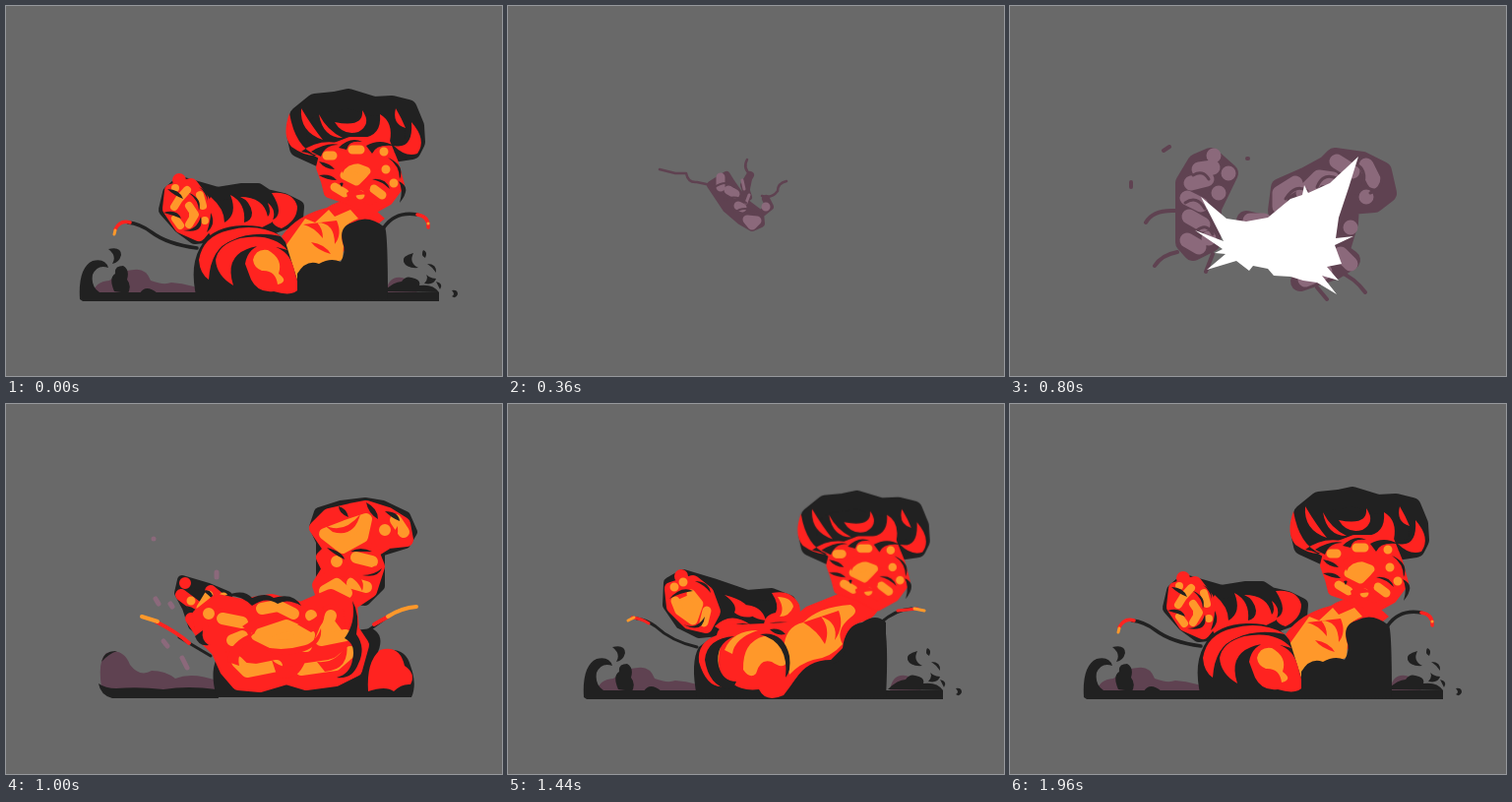
Recreate the animation shown at these times as an HTML page without scripts. Size 504 by 376 pixels, loop 2480 ms.

```html
<!DOCTYPE html>
<html lang="en">
<head>
<meta charset="utf-8">
<title>Explosion</title>
<style>
html,body{margin:0;height:100%;overflow:hidden;background:#696969}
svg{display:block;width:100vw;height:100vh;stroke-width:0;stroke-linecap:round;stroke-linejoin:round}
/* fill and stroke share a colour: a thick stroke turns points into puffs */
.k{fill:#212121;stroke:#212121}
.r{fill:#ff2320;stroke:#ff2320}
.o{fill:#ff982a;stroke:#ff982a}
.p{fill:#5f4251;stroke:#5f4251}
.l{fill:#8b697b;stroke:#8b697b}
.w{fill:#fff}
.s{fill:none}
.pose{opacity:0;animation:2480ms step-end infinite}
#trail{animation-name:trail;transform-origin:160px 165px}
#smoke{animation-name:smoke;transform-origin:245px 215px}
#flash{animation-name:flash;transform-origin:265px 240px}
#fire{animation-name:fire;transform-origin:275px 275px}
#swell{animation-name:swell}
#curl{animation-name:curl}
#roll{animation-name:roll}
#dome{animation-name:dome}
#rest{animation-name:rest}
@keyframes trail{
 4.83%{opacity:1;transform:scale(.15);animation-timing-function:steps(6)}
 14.51%{opacity:1;transform:scale(1)}
 20.96%{opacity:0}}
@keyframes smoke{
 20.96%{opacity:1;transform:scale(.4);animation-timing-function:steps(7)}
 32.25%{opacity:1;transform:scale(1)}
 33.86%{opacity:0}}
@keyframes flash{
 30.64%{opacity:1;transform:scale(.6)}
 32.25%{opacity:1;transform:scale(1)}
 33.86%{opacity:0}}
@keyframes fire{
 33.86%{opacity:1;transform:scale(.7);animation-timing-function:steps(4)}
 40.32%{opacity:1;transform:scale(1)}
 41.93%{opacity:0}}
@keyframes swell{41.93%{opacity:1}49.99%{opacity:0}}
@keyframes curl{49.99%{opacity:1}58.06%{opacity:0}}
@keyframes roll{58.06%{opacity:1}67.74%{opacity:0}}
@keyframes dome{67.74%{opacity:1}79.03%{opacity:0}}
@keyframes rest{0%{opacity:1}4.83%{opacity:0}79.03%{opacity:1}}
</style>
</head>
<body>
<svg viewBox="0 0 504 376">
<defs>
 <!-- young fire -->
 <g id="dirtA">
  <path class="p" d="M97 288Q93 260 102 253Q119 247 126 265Q136 278 148 271Q162 271 172 279Q190 272 216 282V294H100z"/>
  <path class="k" d="M94 284Q101 289 112 289Q135 287 160 290Q185 286 214 290L216 299H108Q96 296 94 284zM97 262Q100 250 113 251Q104 254 97 262z"/>
 </g>
 <g id="bodyA">
  <path class="k" d="M214 298Q206 270 216 255Q245 235 300 236L372 228Q385 235 378 252Q405 244 411 266Q418 285 412 298z"/>
  <path class="r" d="M368 292Q366 262 380 250Q400 244 405 266Q417 274 411 285Q402 284 394 292Q386 286 368 292z"/>
  <path class="r" stroke-width="14" d="M224 270L215 250 200 235 196 215 215 200 240 205 270 200 300 208 330 195 350 205 352 230 362 245 355 270 335 280 305 284 285 278 258 286 236 284z"/>
  <path class="o" stroke-width="12" d="M255 235L285 225 308 235 305 246 275 245zM230 240L240 236M330 215L320 240 345 235M235 262L245 272 275 266M300 270L335 265 350 252M260 208L276 205 292 213M220 218L240 222M206 213h0M310 215h0"/>
  <path class="r" d="M225 262q2-22 28-30q-20 20-16 34zM258 246q20 16 48 4q16-8 14-22q-6 16-20 18q-20 6-42 0zM270 260q18 16 36-4q-8 28-30 22zM316 262q22 2 30-20q4 28-22 30zM240 226q18-14 40-10q-22 4-28 18zM296 224q22-4 26-18q6 18-12 26z"/>
  <path class="k" d="M222 195q20-8 28 2q14-6 22 0q20-6 28 8q-14-8-24-2q-12-8-26 2q-12-12-28-10zM352 200q8 14 4 34q10 14 2 30q-6 16-22 14q14-4 16-18q4-16-8-22q12-16 8-38zM200 230q-2 10 6 15q-10 2-14-9z"/>
 </g>
 <g id="armA">
  <path class="k" stroke-width="10" d="M179 179L176 192 184 207 190 225 208 240 230 230 225 195 206 187z"/>
  <path class="r" stroke-width="12" d="M182 182h0M178 194L194 206M188 218L200 236M208 190L220 200M200 210h10"/>
  <path class="o" stroke-width="9" d="M206 194L198 207M196 220L206 229M218 206h0M188 200h0M221 196h0"/>
  <path class="k" d="M183 205q12 2 15 12q-10-6-15-12zM200 190q10-4 12 12q-5-8-12-12zM191 226q12-4 18 4q-10 0-18-4z"/>
 </g>
 <g id="capA">
  <path class="k" stroke-width="10" d="M313 125L318 110 340 103 365 100 383 103 406 114 413 130 406 142 380 150 380 185 365 200 320 196 320 140z"/>
  <path class="r" stroke-width="14" d="M315 126L328 113 350 108 366 105 388 112 404 122 407 138 388 140 372 150 378 165 370 190 352 202 340 200 322 196 318 184 328 168 322 156 330 148z"/>
  <path class="o" stroke-width="12" d="M324 132L345 124 366 117 362 135 342 146zM396 118L404 130M324 190L336 183 346 192M356 156L372 160M352 182L366 186M336 160h0M385 128h0"/>
  <path class="r" d="M322 122q20 12 38-10q-6 24-28 18zM374 138q16 0 24-14q2 24-20 24zM318 176q16-14 34-6q14 8 10 20q-8-18-22-14zM346 160q12 14 30 4q-10 18-26 8z"/>
  <path class="k" d="M338 104q8 2 10 11q-10-4-10-11zM366 100q12 6 12 17q-10-6-12-17zM385 109q14 0 15 10q-8-3-15-10zM326 146q16 4 18 12q-12-6-18-12zM350 150q10-6 22 0q-12 0-22 0zM362 174q12 0 20-7q-4 10-20 7z"/>
 </g>
 <g id="jetsA" class="s">
  <path class="k s" stroke-width="3" d="M176 237L208 256M385 218L364 233"/>
  <path class="r s" stroke-width="4" d="M152 221Q174 232 186 243M390 215L374 224"/>
  <path class="o s" stroke-width="4" d="M138 216L154 221M417 206Q402 207 388 216"/>
 </g>

 <!-- curling fire -->
 <g id="dirtB">
  <path class="p" d="M78 284Q76 270 90 264Q98 250 112 248Q122 254 113 260Q96 266 100 286Q120 282 130 273Q148 268 152 279Q164 284 170 279Q184 276 196 290zM384 294Q380 276 394 274Q410 286 430 284L442 292z"/>
  <path class="k" d="M84 298Q85 284 91 272Q94 264 104 262Q94 270 97 282Q108 286 116 288Q128 278 136 284Q144 274 150 288Q170 284 196 289H386Q410 284 424 291Q438 286 440 292Q453 286 453 297Q446 294 442 299zM97 253q10-9 20 0q-10 2-20 0zM403 254q12-11 25-1q10 2 8 14q-6-12-14-10q-10-5-19-3zM428 276q8-4 11 5z"/>
  <path class="r" d="M412 253q8-4 14 2zM432 262q5 3 3 5z"/>
 </g>
 <g id="bodyB">
  <path class="k" d="M194 298Q187 262 196 247L225 225 345 225 384 222Q389 240 386 298L290 300z"/>
  <path class="r" d="M196 262Q194 242 214 235Q216 222 240 224L285 222 305 206 350 188 380 202Q378 218 360 222Q344 228 342 248L330 260Q306 260 294 280L282 296Q264 304 257 290Q240 292 230 284Q206 296 196 262z"/>
  <path class="o" d="M282 250Q283 226 302 222Q318 206 350 204Q360 210 350 217Q334 230 342 244Q330 258 312 260Q298 264 288 275zM241 270Q240 242 262 236Q284 236 287 258Q284 272 270 262Q258 258 254 274Q248 280 241 270zM222 250q8-20 34-20q-24 8-26 24zM208 270q-2-16 10-24q-4 16 0 30z"/>
  <path class="r" d="M302 222q14 8 22 22q6-16-4-28q18 6 14 24q10-14 4-30z"/>
  <path class="k" d="M202 260q2-22 30-24q-20 8-16 30q4 16 18 16q-2 6-8 8q-20-4-24-30zM258 234q24-4 30 22q2 16-4 22q4-36-26-44zM268 229q10-2 16 5q-10 2-16-5z"/>
  <path class="k" d="M284 298Q294 274 308 268Q320 258 332 264Q346 258 344 244Q346 224 362 222Q376 212 386 222V298z"/>
 </g>
 <g id="armB">
  <path class="k" stroke-width="12" d="M180 176L166 184 165 206 178 225 196 234 235 230 260 224 292 216 288 202 270 195 245 197 210 185z"/>
  <path class="r" stroke-width="14" d="M178 177h0M190 183L168 190 170 208 186 224 203 228 211 213 204 194z"/>
  <path class="r" d="M222 196q26 6 28 22q-10 2-18-4q4-8-10-18zM240 206q20 0 24 16q-18-2-24-16zM270 194q20-4 28 12q4 16-10 18q-20-2-26 4q0-12 12-14q4-8-4-20zM212 228q16-16 36-2q-16-4-26 8z"/>
  <path class="o" stroke-width="9" d="M180 183h0M188 195L196 205 190 222 176 212 172 202M204 212L201 224M171 188h0"/>
  <path class="o" d="M276 198q14 0 16 10q-4 10-14 10q6-8-2-20z"/>
  <path class="k" d="M166 200q12-14 24-8q-14 2-24 8zM180 226q14 6 22-8q-2 18-22 8zM192 182q14 0 16 12q-6-8-16-12z"/>
 </g>
 <g id="capB">
  <path class="k" stroke-width="16" d="M312 115L325 104 345 99 366 102 390 102 403 114 407 126 421 128 416 144 394 142 366 146 316 148 311 146 317 135z"/>
  <path class="r" stroke-width="12" d="M328 155L335 146 365 142 390 146 394 165 393 182 375 194 350 196 331 186z"/>
  <path class="r" d="M308 132Q312 108 328 112Q342 100 358 110Q370 122 352 140Q338 152 320 148Q304 146 308 132zM366 106Q376 98 394 104Q410 112 416 124Q404 122 405 138Q392 146 382 134Q366 136 366 106z"/>
  <path class="o" stroke-width="10" d="M322 132L340 135 354 128M380 112L394 118M386 130h0M335 160L345 178 360 186M350 162L368 160M376 178L386 184M388 160h0M330 174h0M360 176h0"/>
  <path class="k" d="M334 100q4 14 20 18q-14 4-20-18zM356 104q16 6 16 28q-8-14-16-28zM376 110q12-2 18 14q-10-8-18-14zM324 152q16-6 28-4q14-12 22-8q16 0 24 6q-20-4-26 2q-20 0-24 8q-12-6-24-4zM392 164q8 6 4 22q-2-12-4-22z"/>
  <path class="r" d="M340 172q16-8 26 4q-12-2-18 10zM366 182q8-16 24-14q-14 6-18 22zM348 150q12 8 26 4q-12 14-26-4z"/>
 </g>
 <g id="jetsB">
  <path class="k s" stroke-width="3" d="M196 246Q170 240 154 225Q144 218 135 217M383 221Q398 208 414 207"/>
  <path class="r s" stroke-width="3" d="M147 222Q140 217 130 216M400 209L420 207"/>
  <path class="o s" stroke-width="3" d="M126 219L132 216M417 207L427 209"/>
 </g>

 <!-- cooling dome -->
 <g id="dirtC">
  <path class="p" d="M88 293Q90 280 105 279Q118 268 130 268Q142 266 147 279Q160 284 168 281Q190 282 206 293zM386 292Q388 274 402 276Q414 278 418 292z"/>
  <path class="k" d="M75 298Q73 266 88 259Q101 256 104 266Q93 262 88 273Q86 285 95 291H440V300H78zM104 247q13-3 13 6q-2 8-9 9q5-8-4-15zM110 290Q104 276 111 272Q110 264 119 264Q126 268 123 278Q128 284 124 292zM136 292q6-10 18 0zM384 290q10-10 18-10q4-6 10-4q10 2 8 8q14-2 20 7z"/>
  <path class="k" d="M414 251q-12 3-10 9q3 7 15 6q-10-5-5-15zM424 248q5 2 2 8q-5-3-2-8zM428 262q10 0 9 9q-4-6-9-9zM425 270q6 6 0 12q10 2 12-5q-8 0-12-7zM437 280q8 2 4 8zM453 289q6-1 6 4q-2 5-6 2q4-2 0-6z"/>
 </g>
 <g id="bodyC">
  <path class="r" d="M280 234Q296 212 326 205Q348 190 374 206L385 216 342 250 300 276z"/>
  <path class="o" d="M284 244L304 216 314 220 328 207 334 214 350 207 358 216Q336 224 343 244L342 258 318 264 296 282z"/>
  <path class="r" d="M302 222q10 2 20 14q0-10-6-16q18 0 18 22q8-10 2-24zM310 240q14 2 20 12q-14-4-20-12z"/>
  <path class="k" d="M194 298Q185 262 200 241Q212 224 240 223Q272 222 284 240L298 285 300 300z"/>
  <path class="r" d="M196 258Q200 234 226 228Q255 220 280 234Q250 228 230 238Q208 246 206 278Q197 272 196 258zM213 258Q216 242 238 236Q270 230 286 248Q262 240 245 247Q222 256 231 284Q214 274 213 258zM243 262Q246 244 264 242Q287 246 292 265L298 287Q292 296 272 290Q256 292 249 278z"/>
  <path class="o" d="M251 258Q254 246 266 248Q282 257 277 272Q288 280 276 283Q274 268 260 269Q252 266 251 258z"/>
  <path class="k" d="M296 300V272Q305 257 318 262Q330 255 340 260Q346 250 342 240Q338 224 352 220Q368 211 385 225Q388 230 388 298z"/>
 </g>
 <g id="armC">
  <path class="k" stroke-width="14" d="M177 180L166 190 162 207 177 224 192 235 240 230 270 225 295 216 296 204 282 197 265 193 256 187 240 187 215 191z"/>
  <path class="r" d="M208 194q14 12 14 26q14-8 6-28q16 8 14 28q8-2 8-10q-2-12-12-16q24 0 28 20q4-4 0-14q10 8 4 20q-24 14-58 18q-20-20-4-44zM270 190q22-2 26 14q0 14-16 22q-8-2-10-8q14-6 0-28z"/>
  <path class="r" stroke-width="14" d="M176 177h0M188 182L168 188 166 206 178 224 196 232 206 220 200 198z"/>
  <path class="o" stroke-width="8" d="M184 187L176 196 171 204M186 203L192 212 186 222M172 216L177 223M197 192L200 203M172 185h0M202 218h0"/>
  <path class="k" d="M164 186q12 0 16 10q-10-4-16-10zM160 210q14-4 18 6q-10-4-18-6zM186 190q14 6 10 18q0-10-10-18zM180 228q14 0 18-14q4 18-18 14zM196 184q10 4 9 14q-2-9-9-14zM208 210q6 12-4 20q4-12 4-20z"/>
 </g>
 <g id="capC">
  <path class="k" stroke-width="20" d="M295 130L298 112 314 99 334 97 348 94 374 102 392 101 408 105 415 122 416 138 412 146 385 150 320 154 298 144z"/>
  <path class="r" stroke-width="10" d="M324 148L350 138 385 138 394 160 400 182 388 198 370 208 352 198 328 190 325 178 320 164z"/>
  <path class="r" d="M288 109q-8 22 2 34q14 10 26 9q-22-8-28-43zM300 104q-2 24 22 32q-10-12-22-32zM318 110q4 24 24 24q-16-8-24-24zM334 118q8 14 24 10q14-8 4-22q2 18-28 12zM380 110q14 8 10 28q-14 2-28-4q20-2 18-24zM396 104q-4 16 10 20q-4-10-10-20zM412 118q16 18 6 32q-12 4-24-8q20 4 18-24zM300 148q18-14 42-8l-18 20q-10-10-24-12z"/>
  <path class="o" stroke-width="9" d="M350 162L366 168 356 178 344 172zM326 152h6M374 186L382 192M334 184L344 190M386 166h0M360 192h0M394 180h0M352 146h8M384 148h0"/>
  <path class="k" d="M310 148q16-10 28-7q-14 0-18 12zM338 144q12-12 24-6q-14-2-16 8zM366 142q14-8 28 0q-18-2-22 8zM394 148q12 0 14 8q-8-5-14-8zM388 154q18 8 12 22q0-14-12-22zM318 172q12-2 18 5q-10 0-18-5zM339 180q6-2 2 4zM372 176q14-2 18 10q-8-8-18-10zM399 178q14 6 1 22q4-14-1-22zM318 158q12 2 16 8q-10 0-16-8z"/>
  <path class="r" d="M338 158q14-6 22 2q-14 0-18 10zM364 182q2-14 16-16q-10 6-10 20zM346 190q10-8 22 2q-14-2-20 6z"/>
 </g>
 <g id="jetsC">
  <path class="k s" stroke-width="3.5" d="M194 246Q164 242 148 230Q136 221 124 220M384 225Q396 208 418 212"/>
  <path class="r s" stroke-width="3.5" d="M126 220Q116 217 111 227M418 212Q430 214 429 225"/>
  <path class="o s" stroke-width="3" d="M111 228L110 232M429 221h0"/>
 </g>
</defs>

<g id="trail" class="pose">
 <path class="p s" stroke-width="2.5" d="M154 166L170 170 181 170Q183 180 192 179L206 182M243 156Q238 165 247 172Q246 186 240 200M283 178Q274 180 274 188Q268 196 258 193"/>
 <path class="p" stroke-width="8" d="M206 182L222 172 227 180 234 190 244 202 256 211 257 221 248 225 236 218 222 206zM246 172L240 182 244 194M262 196L266 204 256 212"/>
 <path class="l" stroke-width="9" d="M216 174L216 184M224 187L231 191M234 203L238 205M243 217L253 218 248 223zM262 204h0"/>
 <path class="l s" stroke-width="3" d="M238 177L240 186M245 192L242 200"/>
 <path class="p s" stroke-width="2" d="M210 184Q222 176 230 184M220 198Q230 190 242 200M230 210Q240 202 254 210"/>
</g>

<g id="smoke" class="pose">
 <path class="p s" stroke-width="4" d="M138 220Q145 207 168 208M147 264Q154 253 170 250M199 270L206 252M156 147l6-4M123 179v5M241 155h1M334 270Q350 276 361 291M312 286L322 298"/>
 <path class="p" stroke-width="20" d="M204 154L190 160 178 180 178 212 178 240 186 249 204 240 205 205 222 170zM272 208L275 185 300 174 322 162 330 154 358 158 378 168 383 190 370 200 345 202 344 220 335 250 346 258 330 268 295 280M240 218L270 225"/>
 <path class="l" stroke-width="15" d="M207 152h0M192 166L206 164M222 170h0M184 180L200 176M180 195L194 202M212 190h0M182 214L196 222M180 238L192 245M202 236h0M274 204L274 190 290 180M298 190L314 174 328 176M332 158L348 168M362 162L370 178M362 194h0M346 225h0M336 252L346 262M300 278L320 270M244 218h14"/>
 <path class="p s" stroke-width="3" d="M186 172Q196 166 202 176M178 200Q190 192 198 206M190 228Q200 220 206 232M280 196Q290 180 302 188M312 184Q318 168 334 176M350 160Q364 166 358 184M366 190Q378 186 378 174"/>
</g>

<path id="flash" class="pose w" d="M354 153L344 185 334 215 331 236 349 234 330 243 337 262 322 265 334 279 317 274 332 293 312 281 298 279 285 275 268 274 262 267 247 264 243 269 230 259 200 268 219 252 208 251 216 247 188 228 217 239 194 194 220 216 240 219 262 215 285 196 297 192 299 182 303 190 325 180z"/>

<g id="fire" class="pose">
 <path class="l" stroke-width="5" d="M150 137h0M152 198l3 5M167 203l2 3M214 171v5M160 241l4 5M179 258l5 10"/>
 <use href="#dirtA"/><use href="#jetsA"/><use href="#armA"/><use href="#capA"/><use href="#bodyA"/>
</g>

<g id="swell" class="pose">
 <use href="#dirtB"/><use href="#jetsA" x="-4"/><use href="#armA" x="-8" y="-2"/><use href="#capA" x="3" y="-1"/>
 <use href="#bodyB"/>
</g>

<g id="curl" class="pose">
 <use href="#dirtB"/><use href="#jetsB"/><use href="#armB"/><use href="#bodyB"/><use href="#capB"/>
</g>

<g id="roll" class="pose">
 <use href="#dirtC" x="2"/><use href="#jetsB" x="-4" y="1"/><use href="#armB" x="-2" y="-2"/><use href="#bodyB" x="-2"/>
 <use href="#capC" transform="translate(24 8) scale(.95)"/>
</g>

<g id="dome" class="pose">
 <use href="#dirtC" x="2" y="-1"/>
 <use href="#jetsC" x="4" y="-2"/>
 <use href="#armC" x="2" y="-3"/><use href="#bodyC" x="-3"/><use href="#capC" x="4" y="1"/>
 <path class="o" stroke-width="13" d="M336 164L350 168M346 184L366 176M376 168L388 178M368 200L378 206M184 198L180 210"/>
 <path class="r" d="M340 174q14-6 24 4q-14-2-18 12zM366 192q0-18 18-22q-12 10-12 24z"/>
</g>

<g id="rest" class="pose">
 <use href="#dirtC"/><use href="#jetsC"/><use href="#armC"/><use href="#bodyC"/><use href="#capC"/>
</g>
</svg>
</body>
</html>
```
